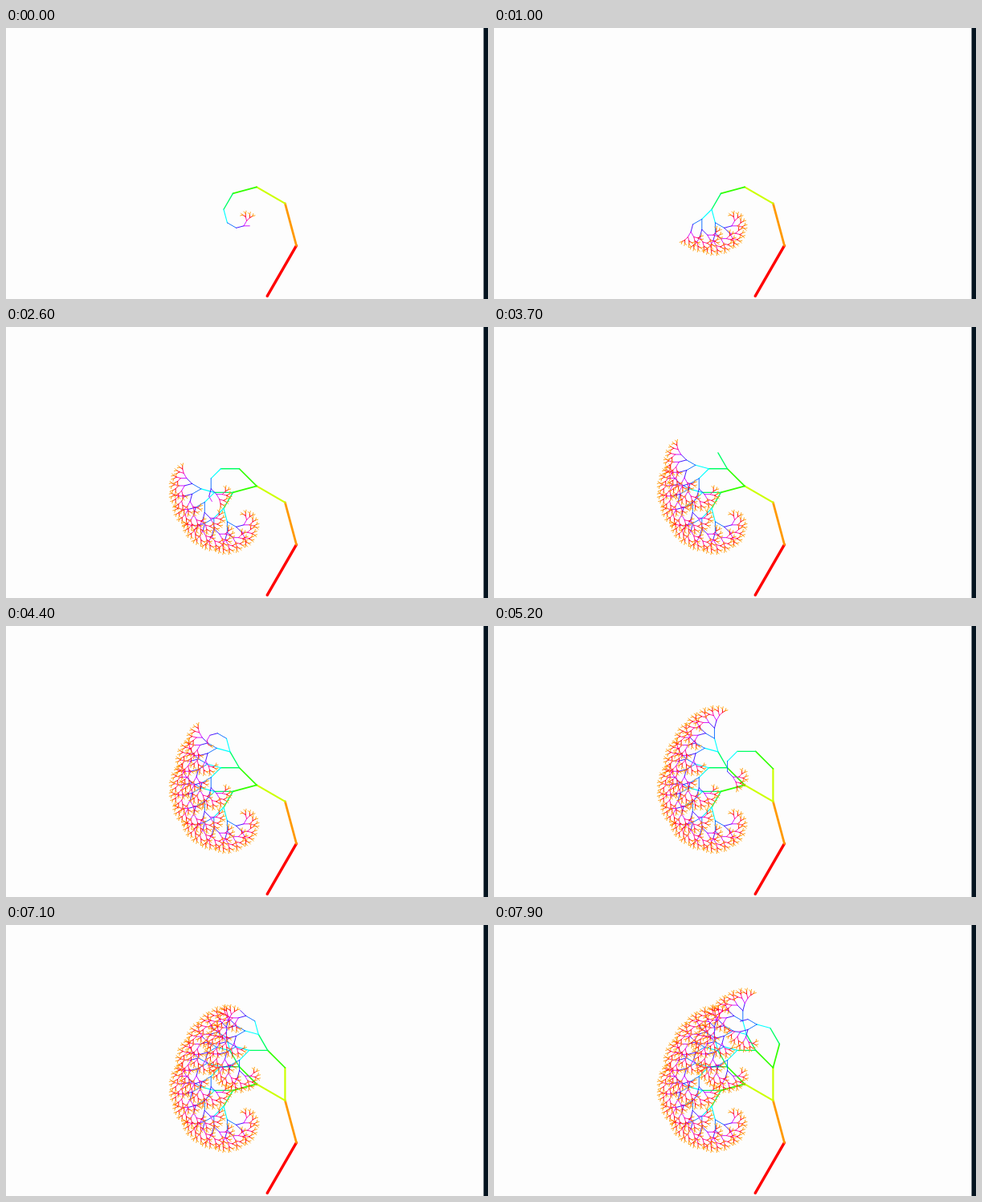
These frames come from a looping animation (600x338 px, 8 s). An HTML page with a canvas:

```html
<!DOCTYPE html>
<html lang="en">
<head>
<meta charset="utf-8">
<title>Fractal tree</title>
<style>
  html, body { margin: 0; width: 100%; height: 100%; overflow: hidden; background: #fdfdfd; }
  canvas { display: block; position: absolute; left: 0; top: 0; }
  .edge {
    position: absolute; left: 594px; top: 0; width: 6px; height: 338px;
    background: linear-gradient(90deg, #7d868c 1px, #04131f 1px);
  }
</style>
</head>
<body>
<canvas id="stage" width="600" height="338"></canvas>
<div class="edge"></div>
<script>
const LOOP = 8000, STEP = 100;
const DEPTH = 12, SHRINK = 0.75, LEFT = 45, RIGHT = -15;
const ctx = document.getElementById('stage').getContext('2d');

// Branches in the order the pen draws them: self, left side, right side.
const branches = [];
function grow(x, y, angle, length, depth) {
  if (depth === DEPTH) return;
  const a = angle * Math.PI / 180;
  const endX = x + length * Math.cos(a), endY = y - length * Math.sin(a);
  branches.push({ x, y, endX, endY, depth });
  for (const turn of [LEFT, RIGHT]) {
    grow(endX, endY, angle + turn, length * SHRINK, depth + 1);
  }
}
grow(325.2, 334.3, 60, 72.6, 0);

// Pace of the pen: [time in ms, branches drawn].
const pace = [[0, 24], [1000, 228], [2600, 551], [3700, 771],
              [5200, 1061], [6300, 1283], [7900, 1605]];
function drawnAt(time) {
  const i = Math.max(1, pace.findIndex(([t]) => t >= time));
  const [t0, n0] = pace[i - 1], [t1, n1] = pace[i];
  return Math.round(n0 + (n1 - n0) * (time - t0) / (t1 - t0));
}

function draw(count) {
  ctx.clearRect(0, 0, 600, 338);
  ctx.lineCap = 'round';
  for (const b of branches.slice(0, count)) {
    ctx.strokeStyle = `hsl(${b.depth * 36 % 360} 100% 50%)`;
    ctx.lineWidth = Math.max(0.9, 3.4 * 0.8 ** b.depth);
    ctx.beginPath();
    ctx.moveTo(b.x, b.y);
    ctx.lineTo(b.endX, b.endY);
    ctx.stroke();
  }
}

let shown = -1;
function tick() {
  const time = Math.floor(performance.now() % LOOP / STEP) * STEP;
  if (time !== shown) draw(drawnAt(time));
  shown = time;
  requestAnimationFrame(tick);
}
tick();
</script>
</body>
</html>
```
